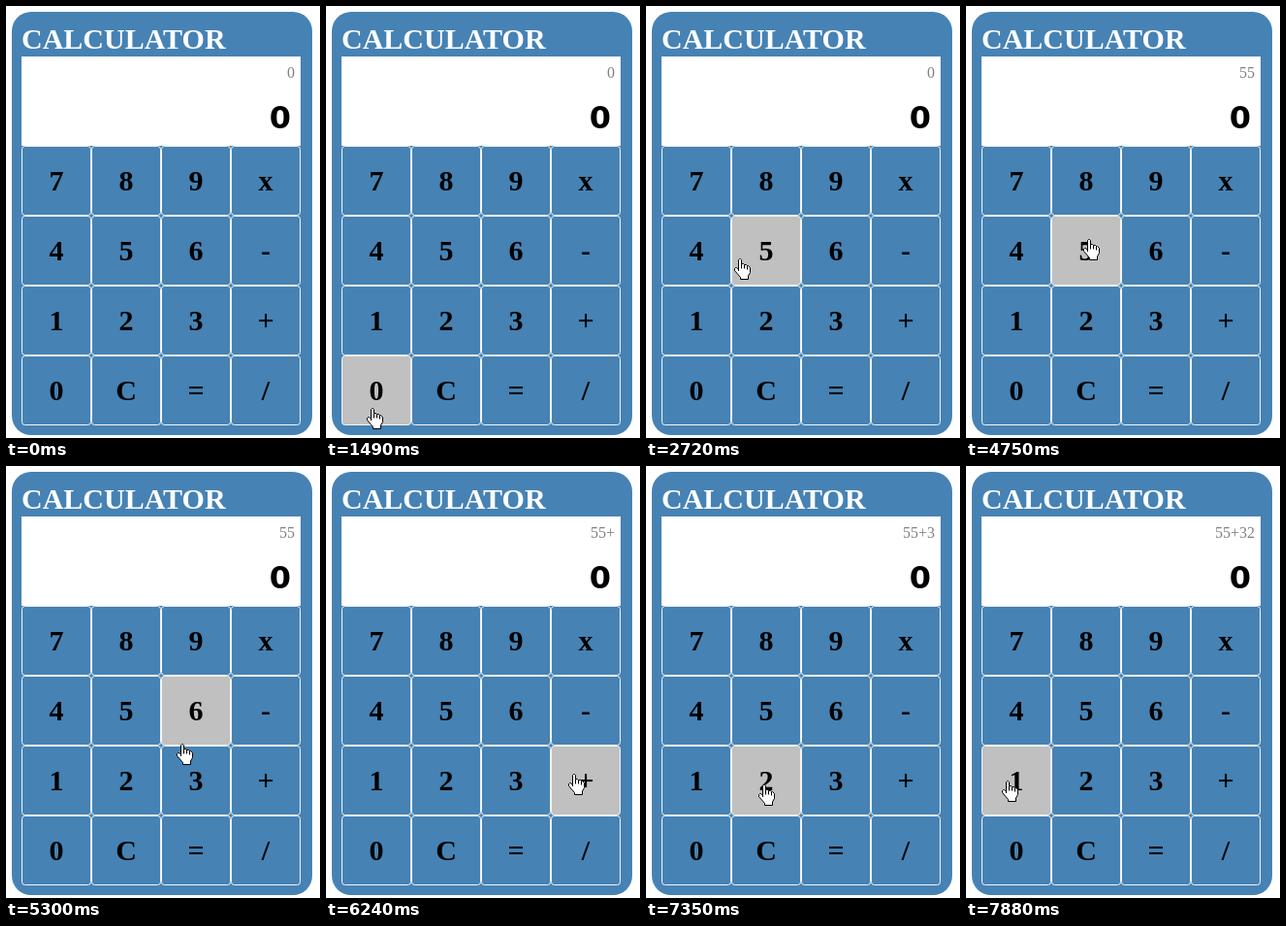
These frames come from a looping animation (324x445 px, 8 s). An HTML page:

```html
<!DOCTYPE html>
<html lang="en">
<head>
<meta charset="utf-8">
<title>Calculator</title>
<style>
  html, body { margin: 0; width: 100%; height: 100%; overflow: hidden; background: #fff; }
  svg { display: block; }
  text { font-family: "Liberation Serif", "Times New Roman", serif; }
  .title, .key text { font-size: 30px; font-weight: bold; }
  .key text { text-anchor: middle; }
  .key rect { fill: #4682b4; stroke: #f5f5f5; }
  .key.hover rect { fill: #c0c0c0; }
  #entry { font-size: 16px; fill: #808080; text-anchor: end; }
  #result { font: bold 32px "DejaVu Sans", Verdana, sans-serif; text-anchor: end; }
</style>
</head>
<body>
<svg id="stage" width="324" height="445" viewBox="0 0 324 445">
  <rect x="6" y="6" width="310" height="436" rx="20" fill="#4682b4"/>
  <text class="title" x="16" y="44" fill="#fff">CALCULATOR</text>
  <rect x="16" y="52" width="288" height="92" fill="#fff"/>
  <text id="entry" x="298" y="74">0</text>
  <text id="result" x="294" y="126">0</text>
  <g id="keys"></g>
  <g id="hand" stroke="#000" stroke-linejoin="round">
    <path fill="#fff" d="M4.5 13V1.5L5.5 .5H6.5L7.5 1.5V5.5H9.5L10.5 6.5H12.5L13.5 7.5H14.5L16.5 9.5V14.5L14.5 18V21.5H6.5V19.5L.5 12.5V10.5L1.5 9.5H2.5L4.5 11.5"/>
    <path fill="none" d="M7.5 5.5V10.5M10.5 6.5V10.5M13.5 7.5V11.5"/>
  </g>
</svg>
<script>
const DURATION = 8000;
const CELL = 72;

// time, pointer x, pointer y, hovered key
const pointerSteps = [
  [1490, 42, 414, "0"], [1610, 46, 391, "0"], [1760, 49, 389, "0"], [1880, 52, 387, "0"],
  [2030, 52, 374, "0"], [2150, 51, 353, "1"], [2270, 49, 330, "1"], [2420, 47, 304, "1"],
  [2570, 69, 284, "1"], [2720, 91, 260, "5"], [2840, 103, 243, "5"], [2980, 121, 240, "5"],
  [5150, 122, 242, "5"], [5300, 176, 286, "6"], [5420, 212, 300, "3"], [5550, 246, 312, "+"],
  [5670, 263, 316, "+"], [5820, 265, 316, "+"], [6240, 250, 317, "+"], [6390, 207, 321, "3"],
  [6540, 187, 323, "3"], [6690, 186, 323, "3"], [6960, 169, 323, "3"], [7080, 140, 326, "2"],
  [7200, 118, 328, "2"], [7350, 116, 328, "2"], [7610, 76, 326, "1"], [7740, 38, 324, "1"],
  [7880, 37, 324, "1"]
];
const entrySteps = [
  [0, "0"], [3570, "5"], [4750, "55"], [6090, "55+"], [6960, "55+3"], [7490, "55+32"]
];

const byId = id => document.getElementById(id);
const entry = byId("entry"), hand = byId("hand"), keys = {};

function svgNode(tag, attributes, parent) {
  const node = document.createElementNS("http://www.w3.org/2000/svg", tag);
  for (const name in attributes) node.setAttribute(name, attributes[name]);
  return parent.appendChild(node);
}

[..."789x456-123+0C=/"].forEach((label, i) => {
  const x = 16 + i % 4 * CELL, y = 144 + Math.floor(i / 4) * CELL;
  const key = svgNode("g", { class: "key" }, byId("keys"));
  svgNode("rect", { x: x + .5, y: y + .5, width: CELL - 1, height: CELL - 1, rx: 3 }, key);
  svgNode("text", { x: x + CELL / 2, y: y + 46 }, key).textContent = label;
  keys[label] = key;
});

const stepAt = (steps, time) => steps.findLast(step => step[0] <= time);

function draw(now) {
  const time = now % DURATION;
  const pointer = stepAt(pointerSteps, time);
  entry.textContent = stepAt(entrySteps, time)[1];
  hand.style.display = pointer ? "" : "none";
  if (pointer) hand.setAttribute("transform", `translate(${pointer[1]} ${pointer[2]})`);
  for (const label in keys) keys[label].classList.toggle("hover", !!pointer && pointer[3] === label);
}

function loop() {
  draw(performance.now());
  requestAnimationFrame(loop);
}
loop();
</script>
</body>
</html>
```
